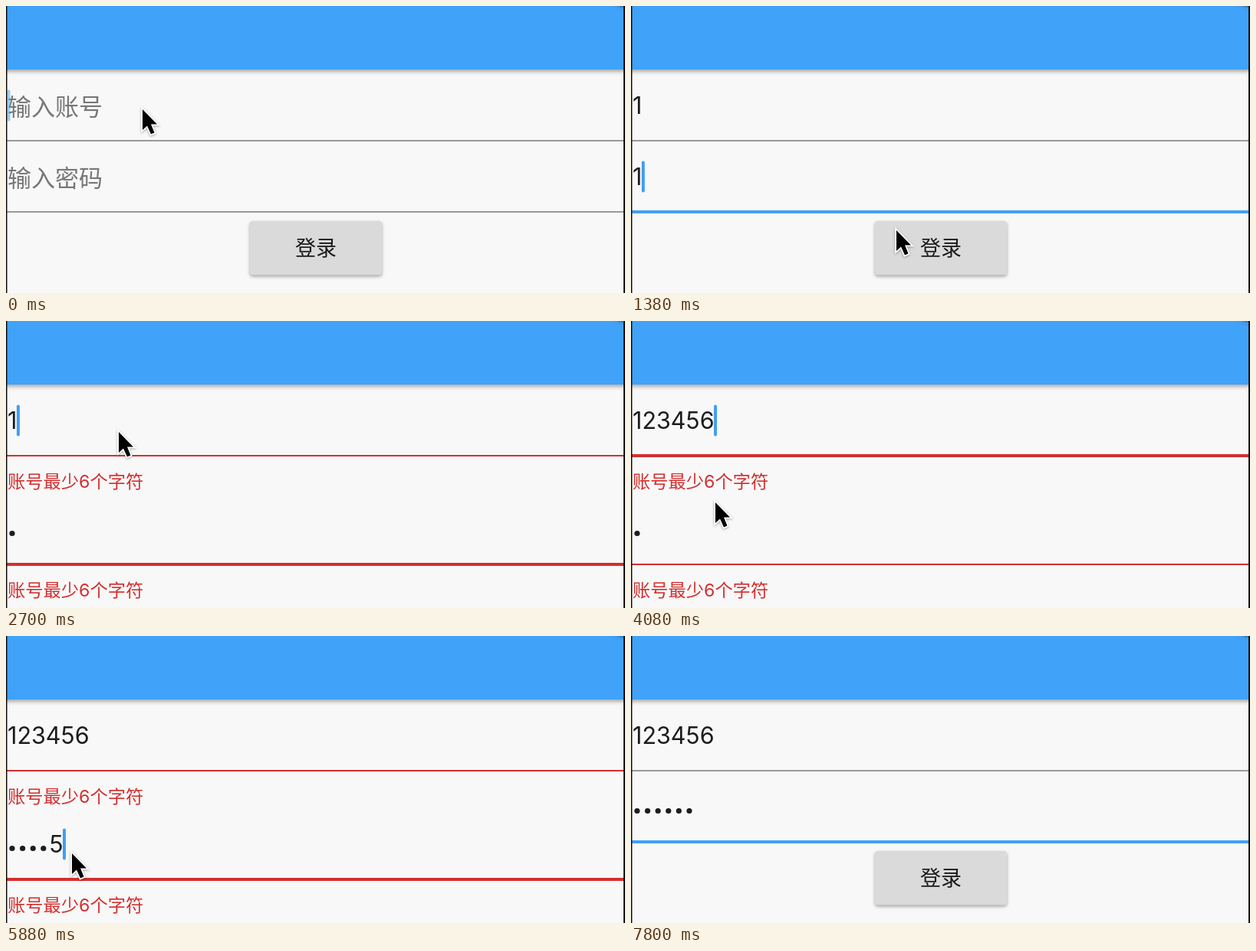
These frames come from a looping animation (807x375 px, 7.86 s). An HTML page with a canvas:

```html
<!DOCTYPE html>
<html lang="zh">
<head>
<meta charset="utf-8">
<style>
  html, body { margin: 0; height: 100%; overflow: hidden; background: #f8f8f8; }
  canvas { display: block; }
</style>
</head>
<body>
<canvas width="807" height="375"></canvas>
<script>
const ctx = document.querySelector('canvas').getContext('2d');
const LOOP = 7860, STEP = 60;
const FONT = 'Inter, "Noto Sans CJK SC", "Noto Sans CJK", sans-serif';
const GREY = [154, 154, 154], BLUE = [64, 160, 245], RED = [211, 47, 47];
const ERROR_ROOM = 49, ERRORS_IN = 1980, ERRORS_OUT = 6840;

const clicks = [0, 900, 2640, 4620];
const nameKeys = [420, 2880, 3060, 3360, 3600, 3840];
const passKeys = [1140, 5340, 5460, 5580, 5700, 5940];
const pointer = [
  [0, 178, 135], [420, 178, 135], [720, 186, 215], [1140, 188, 225],
  [1200, 205, 258], [1260, 255, 285], [1380, 346, 293], [1560, 372, 300],
  [2100, 372, 300], [2520, 147, 148], [2640, 147, 145], [3840, 147, 145],
  [4080, 110, 237], [4380, 86, 284], [5880, 86, 284], [6060, 120, 314],
  [6420, 238, 335], [6599, 238, 335], [6600, 409, 395], [LOOP, 409, 395]
];
const arrow = new Path2D('M0 0V27L6 21.5L11 32.5L15.5 30.5L11 19.5H19Z');

const ramp = (t, start, length = 200) => Math.min(1, Math.max(0, (t - start) / length));
const mix = (a, b, k) => a.map((v, i) => v + (b[i] - v) * k);
const past = (times, t) => times.filter(time => time <= t);

function text(string, x, y, size, color, alpha = 1, weight = 400) {
  ctx.globalAlpha = alpha;
  ctx.font = `${weight} ${size}px ${FONT}`;
  ctx.fillStyle = color;
  ctx.fillText(string, x, y);
  const width = ctx.measureText(string).width;
  ctx.globalAlpha = 1;
  return width;
}

function round(x, y, w, h, r) {
  ctx.beginPath();
  ctx.roundRect(x, y, w, h, r);
}

function disc(x, y, r, color) {
  ctx.fillStyle = color;
  ctx.beginPath();
  ctx.arc(x, y, r, 0, 7);
  ctx.fill();
}

function shadow(color, blur, y) {
  ctx.shadowColor = color;
  ctx.shadowBlur = blur;
  ctx.shadowOffsetY = y;
}

function caretAlpha(t) {
  const age = t - Math.max(...past([...clicks, ...nameKeys, ...passKeys], t));
  if (age < 650) return ramp(t, -100);
  const phase = (age - 150) % 1000;
  return phase < 500 ? ramp(phase, 0) : 1 - ramp(phase, 500);
}

function field(t, y, keys, hint, secret, focus, active, errorAlpha) {
  const typed = past(keys, t), n = typed.length;
  text(hint, 2, y + 59.5, 31, '#777', 1 - ramp(t, keys[0], 150));
  let x = 2, shown = '123456'.slice(0, n);
  if (secret && n) {
    const dots = t - typed[n - 1] < 1500 ? n - 1 : n;
    for (let i = 0; i < dots; i++) disc(8 + 13.6 * i, y + 142 - 83 - 16.5 + 16.5 - 16.5 + 10, 3.6, '#1d1d1d');
    x += 13.6 * dots;
    shown = shown.slice(dots);
  }
  x += text(shown, x, y + 58, 30.5, '#1d1d1d');
  if (active) {
    ctx.globalAlpha = caretAlpha(t);
    ctx.fillStyle = '#429ff0';
    round(x - 0.5, y + 26.5, 4, 41, 2);
    ctx.fill();
    ctx.globalAlpha = 1;
  }
  const red = ramp(t, ERRORS_IN) - ramp(t, 7020);
  const thick = 2 + 2 * focus;
  ctx.fillStyle = `rgb(${mix(mix(GREY, BLUE, focus), RED, red)})`;
  ctx.fillRect(0, y + 93 - thick / 2, 807, thick);
  text('账号最少6个字符', 2, y + 134.5 - 6 * (1 - errorAlpha), 23.25, '#d32f2f', errorAlpha);
}

function button(t, y) {
  const press = ramp(t, 1740, 180) - ramp(t, 2040) + ramp(t, 6660, 180) - ramp(t, 7140, 240);
  ctx.save();
  shadow(`rgba(0,0,0,${0.35 - 0.05 * press})`, 4 + 12 * press, 2 + 5 * press);
  ctx.fillStyle = `rgb(${mix([218, 218, 218], [201, 201, 201], press)})`;
  round(318, y, 172, 70.5, 4);
  ctx.fill();
  ctx.restore();

  const [start, x, dy] = t < 4000 ? [1740, 372, 19] : [6900, 409, 16];
  if (t >= start) {
    ctx.save();
    round(318, y, 172, 70.5, 4);
    ctx.clip();
    ctx.globalAlpha = 1 - ramp(t, start + 240, 240);
    disc(x, y + dy, 11 + Math.max(0, t - start - 60) * 0.6, 'rgba(0,0,0,.14)');
    ctx.restore();
  }
  text('登录', 377, y + 45, 27, '#1a1a1a', 1, 500);
}

function appBar() {
  ctx.save();
  shadow('rgba(0,0,0,.4)', 6, 2);
  ctx.fillStyle = '#40a2f8';
  ctx.fillRect(-10, -10, 827, 93);
  ctx.restore();
  ctx.save();
  shadow('rgba(40,60,80,.5)', 5, 0);
  ctx.fillStyle = 'rgba(60,100,140,.6)';
  ctx.beginPath();
  ctx.moveTo(790, -2);
  ctx.lineTo(807, -2);
  ctx.lineTo(807, 3);
  ctx.fill();
  ctx.restore();
}

function drawPointer(t) {
  const i = pointer.findIndex(([time]) => time > t);
  const [t0, ...from] = pointer[i - 1], [t1, ...to] = pointer[i];
  ctx.save();
  ctx.translate(...mix(from, to, (t - t0) / (t1 - t0)));
  ctx.lineWidth = 3.5;
  ctx.strokeStyle = '#fff';
  shadow('rgba(0,0,0,.35)', 3, 1);
  ctx.stroke(arrow);
  ctx.shadowColor = 'transparent';
  ctx.fillStyle = '#000';
  ctx.fill(arrow);
  ctx.restore();
}

function draw(t) {
  const shift = t >= ERRORS_IN && t < ERRORS_OUT ? ERROR_ROOM : 0;
  const errorAlpha = ramp(t, ERRORS_IN) - ramp(t, ERRORS_OUT - 200);
  const nameFocus = ramp(t, 60) - ramp(t, 900) + ramp(t, 2700) - ramp(t, 4620);
  const passFocus = ramp(t, 900) - ramp(t, 2700) + ramp(t, 4620);
  const nameActive = past(clicks, t).length % 2 === 1;

  ctx.fillStyle = '#f8f8f8';
  ctx.fillRect(0, 0, 807, 375);
  field(t, 83, nameKeys, '输入账号', false, nameFocus, nameActive, errorAlpha);
  field(t, 176 + shift, passKeys, '输入密码', true, passFocus, !nameActive, errorAlpha);
  button(t, 281 + shift * 2);
  appBar();
  ctx.fillStyle = '#111';
  ctx.fillRect(0, 0, 1.5, 375);
  ctx.fillRect(805, 0, 2, 375);
  drawPointer(t);
}

function tick() {
  draw(Math.floor(performance.now() % LOOP / STEP) * STEP);
  requestAnimationFrame(tick);
}
tick();
</script>
</body>
</html>
```
